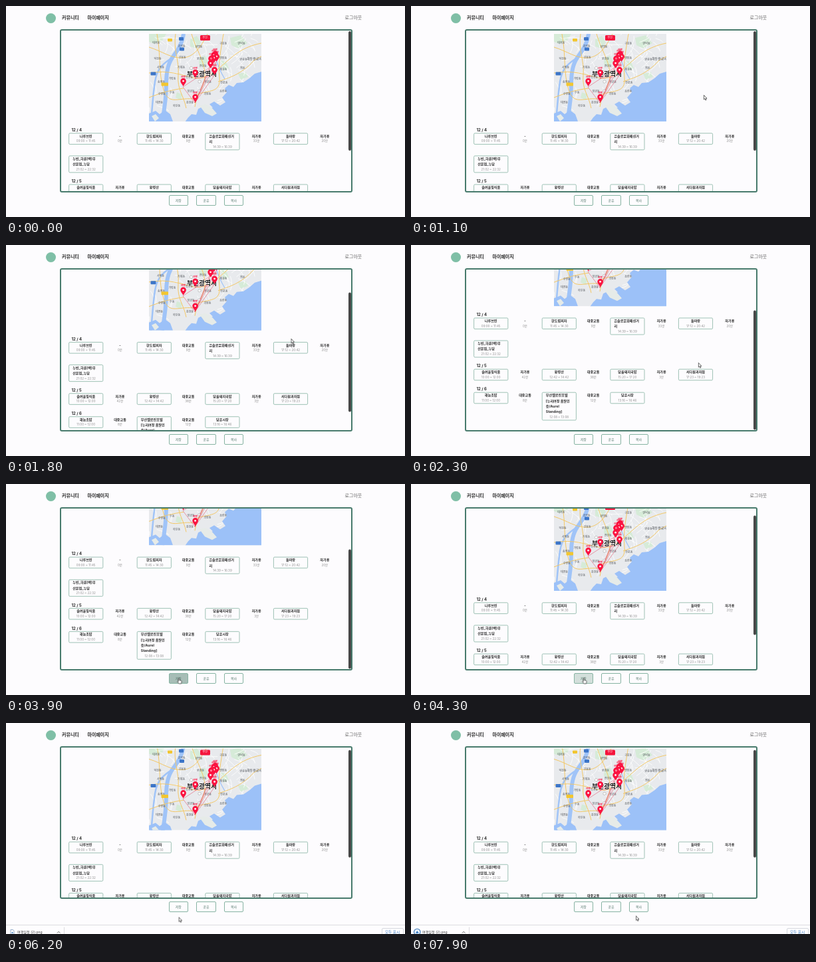
Animation, 600 px wide and 318 px high, one loop 8000 ms. Source, as an HTML page:

```html
<!DOCTYPE html>
<html lang="ko">
<head>
<meta charset="utf-8">
<title>여행 일정</title>
<style>
@property --scroll { syntax: "<number>"; inherits: true; initial-value: 0; }
@property --fit { syntax: "<number>"; inherits: true; initial-value: 0; }

html, body { margin: 0; width: 100%; height: 100%; overflow: hidden; background: #fdfcfe; }
body { font-family: Inter, "Noto Sans CJK KR", "Noto Sans CJK", sans-serif; color: #2b2b2b; }
main { position: relative; width: 600px; height: 318px; overflow: hidden;
  animation: scroll 8s linear infinite, fit 8s linear infinite; }
main > *, .panel > *, .bar > * { position: absolute; }
svg { display: block; overflow: visible; }

nav { top: 12.6px; left: 0; font-weight: 600; font-size: 7px; line-height: 10px; }
nav span { position: absolute; white-space: nowrap; }
.logo { left: 59.6px; top: 10.8px; width: 15.5px; height: 15.5px; border-radius: 50%; background: #7fbfa6; }

.panel { left: 81px; top: 35px; width: 436px; height: calc(241.5px - var(--fit) * 15.7px);
  border: 2px solid #477a6c; border-radius: 3px; overflow: hidden; }
.list { left: .5px; top: 0; transform: translateY(calc(var(--scroll) * -1px)); }
.map { position: relative; margin: 5px 0 0 131.5px; width: 168.5px; overflow: hidden;
  height: calc(131.5px - var(--fit) * 8.6px); background: #e8eaed; }
.map > svg { position: absolute; left: 0; top: calc(var(--fit) * -4.3px); }
.tag { position: absolute; left: 77px; top: 2px; width: 14.5px; height: 7.5px; border-radius: 1.5px;
  background: #f5143c; color: #fff; font-size: 4px; line-height: 7.5px; text-align: center; }
.thumb { right: 0; top: .5px; width: 4px; border-radius: 2px; background: #474747;
  height: calc(180px - var(--fit) * 18px); transform: translateY(calc(var(--scroll) * .74px)); }

.head { font-size: 6px; font-weight: 700; }
.name { font-size: 5.1px; font-weight: 700; }
.time { font-size: 4.5px; fill: #8e8e8e; }
.mid { text-anchor: middle; }

.btn { box-sizing: border-box; top: calc(284.7px - var(--fit) * 15.8px); width: 29.5px; height: 16.2px;
  border: .8px solid #86b3a2; border-radius: 2px; color: #55796d; font-size: 5px; line-height: 14.8px; text-align: center; }
.save { animation: press 8s linear infinite; }

.bar { left: 0; top: 304.4px; width: 600px; height: 14px; background: #fefdff; border-top: .8px solid #dcdce0;
  animation: rise 8s linear infinite; }
.item { left: 0; top: 0; width: 88px; height: 14px; overflow: hidden; animation: grow 8s ease-out infinite; }
.item svg { position: absolute; top: 0; }
.item .end { right: 0; }
.label { animation: late 8s linear infinite; }
.ring { left: 0; top: 0; animation: pulse 8s linear infinite; }
.all { left: 564.5px; top: 3.4px; width: 31px; height: 16px; border: .7px solid #d5d8de; border-radius: 2px;
  color: #3d7fc4; font-size: 5.6px; line-height: 11px; text-align: center; }
.drop { left: 0; top: 0; animation: drop 8s linear infinite; }
.cursor { left: 0; top: 0; animation: move 8s linear infinite; }
.arrow { animation: arrow 8s linear infinite; }
.hand { animation: hand 8s linear infinite; }

@keyframes scroll {
  0%, 18.75% { --scroll: 0; } 20% { --scroll: 1; } 21.25% { --scroll: 16; } 22.5% { --scroll: 45; }
  23.75% { --scroll: 70; } 25%, 48.75% { --scroll: 81.8; }
  50% { --scroll: 66; } 51.25% { --scroll: 42; } 52.5% { --scroll: 24; } 53.75% { --scroll: 13; }
  56.25%, 61.25% { --scroll: 6; } 63.75%, 100% { --scroll: 3.6; }
}
@keyframes fit { 0%, 68.74% { --fit: 0; } 68.75%, 100% { --fit: 1; } }
@keyframes press {
  0%, 38.75% { background: #e9f0ee00; } 42.5%, 46.25% { background: #e9f0ee; }
  47.5% { background: #bfd1cb; } 48.75% { background: #a7bdb6; }
  56.25%, 68.74% { background: #e9f0ee; } 68.75%, 100% { background: #e9f0ee00; }
}
@keyframes rise {
  0%, 67.49% { transform: translateY(15px); } 67.5% { transform: translateY(.5px); }
  68.75%, 100% { transform: none; }
}
@keyframes grow { 0%, 67.5% { width: 17.5px; } 76.25%, 100% { width: 88px; } }
@keyframes late { 0%, 68.74% { opacity: 0; } 68.75%, 100% { opacity: 1; } }
@keyframes pulse {
  0%, 67.49% { opacity: 0; } 67.5%, 70% { opacity: 1; } 76.25%, 80% { opacity: 0; }
  86.25% { opacity: 1; } 92.5% { opacity: .1; } 98.75%, 100% { opacity: 1; }
}
@keyframes drop {
  0%, 67.49% { opacity: 0; transform: none; } 67.5% { opacity: .6; transform: none; }
  75%, 100% { opacity: 0; transform: translateY(18px); }
}
@keyframes move {
  0%, 6.25% { transform: translate(555px, 177px); } 7.5% { transform: translate(520px, 150px); }
  8.75% { transform: translate(480px, 129px); } 10% { transform: translate(456px, 123px); }
  11.25%, 12.5% { transform: translate(446px, 130px); } 15% { transform: translate(434px, 138px); }
  16.25%, 27.5% { transform: translate(428.5px, 141px); } 28.75% { transform: translate(432px, 177px); }
  31.25% { transform: translate(400px, 225px); } 33.75% { transform: translate(330px, 270px); }
  36.25% { transform: translate(262px, 279px); } 37.5% { transform: translate(255px, 277px); }
  38.75% { transform: translate(279px, 292px); } 40% { transform: translate(266px, 293px); }
  42.5%, 90% { transform: translate(259.6px, 292.5px); } 92.5% { transform: translate(272px, 294px); }
  96.25% { transform: translate(322px, 293px); } 98.75%, 100% { transform: translate(338px, 290.5px); }
}
@keyframes arrow {
  0%, 6.24% { opacity: 0; } 6.25%, 39.99% { opacity: 1; }
  40%, 68.74% { opacity: 0; } 68.75%, 100% { opacity: 1; }
}
@keyframes hand { 0%, 39.99% { opacity: 0; } 40%, 68.74% { opacity: 1; } 68.75%, 100% { opacity: 0; } }
</style>
</head>
<body>
<main>
  <div class="logo"></div>
  <nav>
    <span style="left:84px">커뮤니티</span>
    <span style="left:122.5px">마이페이지</span>
    <span style="left:509.5px;font-weight:400;color:#666">로그아웃</span>
  </nav>

  <section class="panel">
    <div class="list">
      <div class="map">
        <svg width="168.5" height="131.5">
          <g fill="#d6ebd8">
            <path d="M0 0h26l-6 10-12 5-8-3zM62 8l10-5 6 10-7 9-9-3zM122 6l16-4 10 12-14 8-10-5z"/>
            <path d="M76 36l8-3 5 9-8 8-6-5zM108 40l8 2 4 10-8 4zM42 88l8 3-2 9-8-4zM134 60l12-2 3 7-11 4z"/>
          </g>
          <g id="streets" fill="none" stroke="#fff" stroke-width=".8"></g>
          <g fill="none" stroke="#a0c4f8">
            <path d="M52 0C50 16 42 26 35 36S26 58 26 74 25 104 20 132" stroke-width="6"/>
            <path d="M35 36C22 44 12 52 9 72S5 110 3 132" stroke-width="2.500"/>
            <path d="M100 36C104 50 108 58 114 68" stroke-width="1.200"/>
          </g>
          <path fill="#9cc1f8" d="M169 57l-10 3-8 7-9 6-10 1-5 6-7-3-6 5 3 6-7 8 5 7-8 5-9-6-7 4 5 5-8 3-8-4-6 3-3 9-7-1-5 5-5 7 2 5h123z"/>
          <path fill="#9cc1f8" d="M0 120l10-4 6 5 8-6 8 6 4 11H0z"/>
          <path fill="#e6ebe8" d="M76 108l9-2 10 6 7 8-7 4-11-5zM4 124l6-3 5 6-6 5z"/>
          <g fill="none" stroke="#f3c765" stroke-width="1">
            <path d="M0 20C20 26 34 38 52 36S80 16 88 0"/>
            <path d="M0 59C30 54 48 62 66 66S96 60 112 46 140 20 169 14"/>
            <path d="M64 0C70 22 82 38 84 58S72 88 69 110"/>
            <path d="M12 0C18 30 14 60 22 84S42 96 66 98"/>
            <path d="M112 0C108 26 104 42 106 66S90 84 70 92"/>
            <path d="M104 72C120 66 138 62 158 40L169 34"/>
            <path d="M0 96C20 88 36 84 52 82M40 0C36 24 46 40 44 62S52 92 56 112"/>
          </g>
          <g id="places" font-size="4" fill="#4a4e54"></g>
          <g fill="#3c75c8">
            <rect x="45" y="5" width="7" height="5" rx="1"/><rect x="46" y="20.500" width="7" height="5" rx="1"/>
            <rect x="2.500" y="57.500" width="8" height="5" rx="1"/>
          </g>
          <g fill="#f2c62f">
            <rect x="18.500" y="73.500" width="10.500" height="5" rx="1"/><rect x="28" y="7" width="7" height="4.500" rx="1"/>
          </g>
          <g fill="#fff" stroke="#777" stroke-width=".4">
            <circle cx="63.500" cy="51.500" r="2.200"/><circle cx="76" cy="72" r="2.200"/><circle cx="76" cy="86" r="2.200"/>
          </g>
          <path d="M69 104L51 80 92 53 69 104 98 63 93 46 69 104 101 43 69 67 98 63" fill="none" stroke="#e0405c" stroke-width=".5"/>
          <text x="79.500" y="64.300" class="mid" font-size="9.800" font-weight="600" fill="#181818" stroke="#fff" stroke-width="1" paint-order="stroke">부산광역시</text>
          <g id="pins" fill="#fb1340"></g>
        </svg>
        <div class="tag">부산</div>
      </div>
      <svg id="plan" width="436" height="180" viewBox="83.5 173.5 436 180" fill="#2b2b2b"></svg>
    </div>
    <div class="thumb"></div>
  </section>

  <div class="btn save" style="left:244.6px">저장</div>
  <div class="btn" style="left:286.2px">공유</div>
  <div class="btn" style="left:327.8px">복사</div>

  <div class="bar">
    <div class="item">
      <svg class="label" width="72" height="14">
        <path d="M7 6.500h3.500l1.500 1.500v6H7z" fill="#fff" stroke="#6d8fb5" stroke-width=".7"/>
        <path d="M8 12l1.500-2.500 1.500 2.500z" fill="#3d7fc4"/>
        <text x="17" y="12.400" font-size="5.100" fill="#444">여행일정 (2).png</text>
      </svg>
      <svg class="end" width="12" height="14" fill="none">
        <path class="label" d="M1 11.500l2.200-2.200 2.200 2.200" stroke="#555" stroke-width=".9"/>
        <path d="M11.500 2.500V14" stroke="#d5d5da" stroke-width=".8"/>
      </svg>
    </div>
    <svg class="ring" width="20" height="14">
      <circle cx="9.300" cy="10.100" r="4.800" fill="#eaf2fb" stroke="#3472b4" stroke-width="1.100"/>
      <path d="M6.800 12l2.500-4 2.500 4z" fill="#3d7fc4"/>
    </svg>
    <div class="all">모두 표시</div>
  </div>
  <svg class="drop" width="24" height="300" fill="#5b93dc">
    <path d="M10.500 283h3v4h2.700l-4.200 4.300-4.200-4.300h2.700zM6.500 295.300h11.500v1.300H6.500z"/>
  </svg>

  <svg class="cursor" width="10" height="12" fill="#fff" stroke="#222" stroke-width=".7" stroke-linejoin="round">
    <path class="arrow" d="M.4 .3v6.600l1.500-1.300 1 2.300 1.100-.5-1-2.200h2z"/>
    <path class="hand" d="M-.4 .6q.8-.8 1.500 0v2.600l2.800.7q.8.400.6 1.300l-.6 3.200H.3l-2.100-3q0-1.200 1.400-.3z"/>
  </svg>
</main>

<script>
const NS = 'http://www.w3.org/2000/svg';
const $ = id => document.getElementById(id);

function add(parent, tag, attrs, text) {
  const el = document.createElementNS(NS, tag);
  for (const key in attrs) el.setAttribute(key, attrs[key]);
  if (text) el.textContent = text;
  parent.append(el);
}

// Entries are "name lines|time"; every second one is the trip between two stops.
const days = [
  ['12 / 4', 191.3, [
    '나루브린|09:00 ~ 11:45', '-|0분', '한도렴피자|11:45 ~ 14:30', '대중교통|9분',
    '은솔로문화패션거/리|14:39 ~ 16:39', '자가용|33분', '들마랑|17:12 ~ 20:42', '자가용|20분',
    '누빈_하론(백)부/산본점_누담|21:02 ~ 22:32']],
  ['12 / 5', 268.5, [
    '솔여울빛식품|10:00 ~ 12:00', '자가용|42분', '황령산|12:42 ~ 14:42', '대중교통|38분',
    '담율돼지국밥|15:20 ~ 17:20', '자가용|3분', '서다훤과자점|17:23 ~ 19:23']],
  ['12 / 6', 303.5, [
    '해늠초밥|11:00 ~ 12:00', '대중교통|8분',
    '부산벨로린호텔/[누리여정 품질인/증,Aurel/Standing]|12:08 ~ 13:08',
    '대중교통|12분', '담온시장|13:16 ~ 16:46']]
];

const plan = $('plan');
for (const [date, top, items] of days) {
  add(plan, 'text', { x: 98, y: top - 2.7, class: 'head' }, date);
  items.forEach((item, i) => {
    const [name, time] = item.split('|');
    const lines = name.split('/');
    const x = 119.7 + (i % 8) * 51.3;
    const y = top + Math.floor(i / 8) * 34.1;
    const h = 8.2 + 8.4 * lines.length;
    const wrapped = lines.length > 1;
    if (i % 2 === 0) {
      add(plan, 'rect', { x: x - 25.6, y, width: 51.2, height: h, rx: 1.5,
        fill: 'none', stroke: '#86b3a2', 'stroke-width': .8 });
    }
    lines.forEach((line, n) => add(plan, 'text', {
      x: wrapped ? x - 20 : x, y: y + 6.1 + n * 8.3, class: wrapped ? 'name' : 'name mid'
    }, line.replace(',', '/')));
    add(plan, 'text', { x, y: y + h - 3, class: 'time mid' }, time);
  });
}

let seed = 7;
const rand = () => (seed = seed * 16807 % 2147483647) / 2147483647;

for (let i = 0; i < 110; i++) {
  const x = rand() * 160, y = rand() * 120, a = rand() * 6.3, r = 8 + rand() * 18;
  const dx = Math.cos(a) * r, dy = Math.sin(a) * r;
  add($('streets'), 'path', { d: `M${x} ${y}q${dx / 2 + 4} ${dy / 2} ${dx} ${dy}` });
}

const places = '대저동 금곡동 화명동 구포동 만덕동 덕천동 강동동 온천동 명장동 반송동 사직동 거제동 연산동 ' +
  '재송동 좌동 송정동 가락동 학장동 개금동 전포동 수영동 우동 엄궁동 괴정동 초량동 대연동 하단동 감천동';
places.split(' ').forEach((name, i) => {
  const row = Math.floor(i / 5);
  add($('places'), 'text', {
    x: 5 + (i % 5) * (row < 3 ? 31 : 24) + rand() * 10, y: 13 + row * 18 + rand() * 9
  }, name);
});
add($('places'), 'text', { x: 147, y: 39, 'font-size': 5 }, '해동용궁사');

const pins = [[99, 39], [97, 41], [101, 43], [97, 45], [93, 46], [92, 53], [98, 63], [69, 67], [51, 80], [69, 104]];
for (const [x, y] of pins) {
  const at = { transform: `translate(${x + .6} ${y - .7})` };
  add($('pins'), 'path', { ...at, d: 'M0 0C-1-3-4.300-5-4.300-8.300A4.300 4.300 0 1 1 4.300-8.300C4.300-5 1-3 0 0Z' });
  add($('pins'), 'circle', { ...at, cy: -8.2, r: 1.4, fill: '#fff' });
  add($('pins'), 'text', { ...at, y: -13.6, class: 'mid', 'font-size': 3.6, 'font-weight': 700 }, '여행');
}
</script>
</body>
</html>
```
